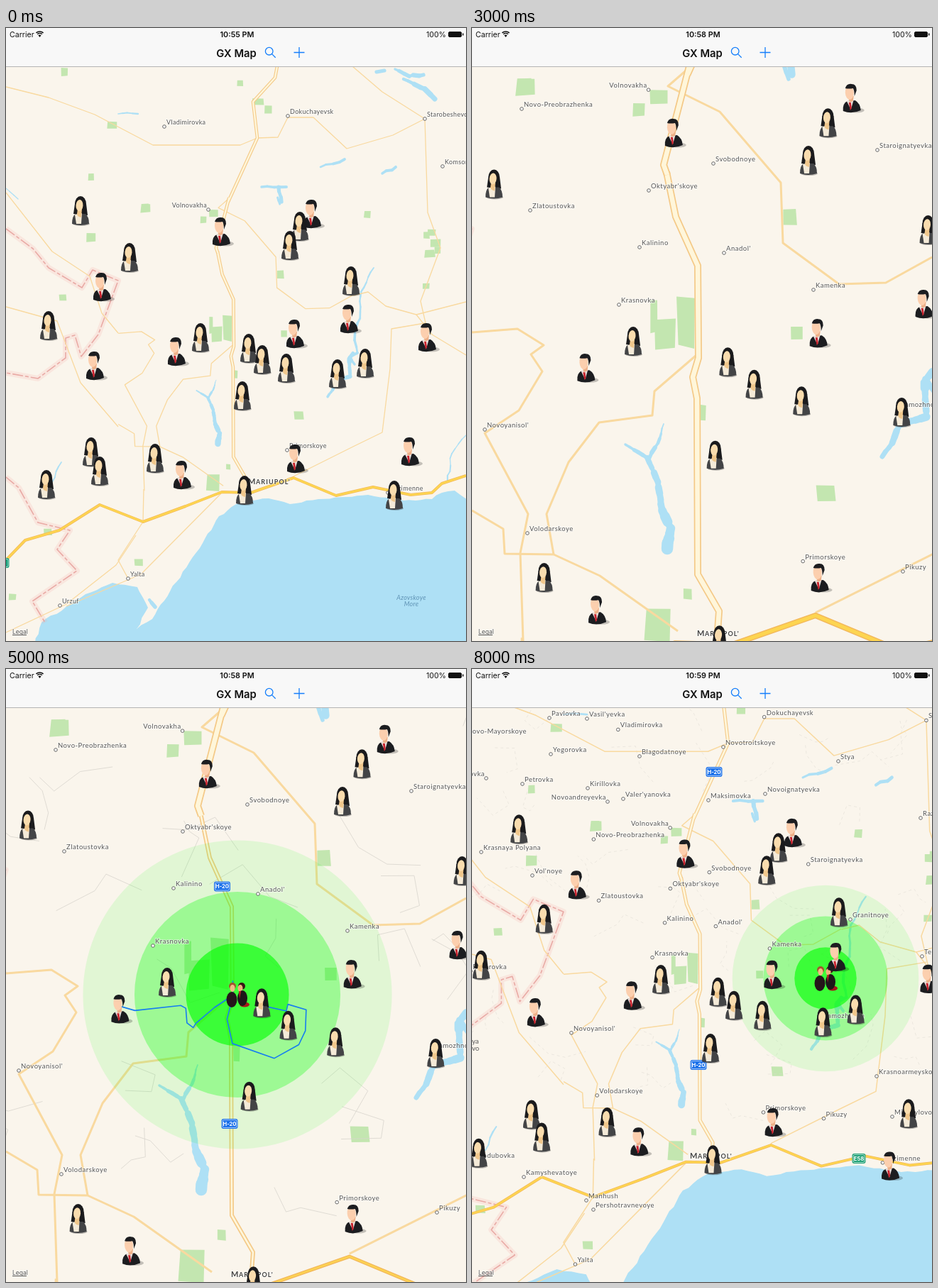
Animation of 648x864 px, one loop 9 s. Source, as an HTML page with a canvas:

```html
<!DOCTYPE html>
<html lang="en">
<head>
<meta charset="utf-8">
<title>Map demo</title>
<style>
  html, body { margin: 0; height: 100%; overflow: hidden; background: #faf5ec; }
  canvas { display: block; width: 648px; height: 864px; }
</style>
</head>
<body>
<canvas id="stage" width="648" height="864"></canvas>
<script>
const g = document.getElementById('stage').getContext('2d');
const UI = 'Inter, Roboto, sans-serif', MAP = 'Lato, "Open Sans", sans-serif';
const BLUE = '#147efb', WATER = '#aee0f5', PARK = '#c3e6b0';

// Map views: scale and offset from the wide view, then line widths
const WIDE = { k: 1, x: 0, y: 0, road: 1.3, main: 4.6, coast: 4 };
const TOWN = { k: 1.96, x: -310, y: -414.6, road: 3, main: 10, coast: 8 };
const NEAR = { k: 3.583, x: -833.7, y: -1114.9, road: 4, main: 9, coast: 8 };
const AREA = { k: 1.183, x: -58, y: -79, road: 1.5, main: 5, coast: 4 };

const OLD_SPOT = [324.5, 445.7], NEW_SPOT = [470, 435.3];
const SCENES = [
  { view: WIDE, time: '10:55' },
  { view: WIDE, time: '10:57', callout: true },
  { view: WIDE, time: '10:57', callout: true, popover: true },
  { view: TOWN, time: '10:58' },
  { view: TOWN, time: '10:58', spot: OLD_SPOT, detail: true },
  { view: TOWN, time: '10:58', spot: OLD_SPOT, detail: true, routes: 2 },
  { view: NEAR, time: '10:59', spot: OLD_SPOT, detail: true, routes: 3 },
  { view: AREA, time: '10:59', spot: OLD_SPOT, routes: 3 },
  { view: AREA, time: '10:59', spot: NEW_SPOT }
];

function random(seed) {
  return () => {
    seed = (seed * 1664525 + 1013904223) >>> 0;
    return seed / 2 ** 32;
  };
}

const points = s => s.trim().split(/\s+/).map(p => p.split(',').map(Number));
const mix = (a, b, t) => a + (b - a) * t;

// Splits every segment into short ones with small seeded bends
function rough(pts, amount, seed = 7) {
  const rnd = random(seed);
  return pts.flatMap(([x, y], i) => {
    const [nx, ny] = pts[i + 1] || [x, y];
    const steps = Math.max(1, Math.round(Math.hypot(nx - x, ny - y) / 8));
    return Array.from({ length: steps }, (_, j) => {
      const bend = j ? amount * (rnd() - .5) : 0, t = j / steps;
      return [mix(x, nx, t) + bend, mix(y, ny, t) + bend];
    });
  });
}

// Each geometry layer: base view, then polylines of key points
const layer = (base, ...lines) => lines.map(s => [base, points(s)]);

const northRoad = [
  ...layer(WIDE, '382,54 379,70 348,104 354,155 313,245'),
  ...layer(TOWN, '306,54 270,193 275,207')
];
const southRoad = layer(TOWN, '274,203 287,266 318,335 319,465 311,492 317,522 318,770 348,822 345,864');
const coastRoad = layer(WIDE, '0,750 27,722 75,708 132,672 193,696 253,674 304,654 345,655 405,634 465,659 517,647 570,658 600,655 614,642 648,631');
const roads = [
  ...layer(WIDE,
    '0,83 60,98 125,122 207,165 330,165 354,155 383,154 397,126 433,126 480,170 545,151 590,128',
    '488,54 530,90 590,128 594,260 612,310 584,385 592,420',
    '489,377 510,372 535,392 578,404 648,386',
    '590,416 543,424 541,480 530,570 489,590 405,632',
    '578,404 600,432 648,461',
    '0,232 65,315 118,350 135,402 158,430',
    '194,650 193,696 158,750 172,776',
    '0,393 72,413 105,500 158,562',
    '0,852 85,812 155,757 183,715',
    '85,815 190,770 304,655'),
  ...layer(TOWN,
    '306,56 276,82 349,118 435,218 438,303 517,361 583,359 648,323',
    '0,429 64,424 101,447 83,460 99,484 66,539 18,571 79,685 68,740 72,864',
    '0,680 44,706 46,741 115,742 180,772 290,850',
    '315,462 257,512 254,546 179,556 136,612 105,685 115,742')
];
const border = layer(WIDE,
  '0,283 38,311 60,338 107,366 122,341 158,356 130,432 106,463 97,433 84,437 84,465 45,494 0,486',
  '0,633 18,648 45,697 90,708 72,735 100,765 37,808 55,838');
const routes = layer(NEAR,
  '27,512 65,523 183,510 196,517 199,555 215,567 222,556 270,515 317,484 317,446',
  '304,491 318,484 302,545 316,608 424,646 487,611 504,575 506,521 459,507 455,524 400,512',
  '506,521 520,448 587,455 602,444 618,395 626,392 620,425');
const sea = rough(points(`30,900 50,838 112,798 150,782 185,788 200,817 184,847 206,833 231,794 277,726 300,688
  330,668 370,663 400,671 440,664 510,658 560,666 600,664 614,655 632,652 660,672 660,900`), 2);

// Lakes and rivers: spine, start width, end width
const waters = [
  [WIDE, '522,62 533,60', 6, 7], [WIDE, '548,58 568,68 588,66', 4, 7], [WIDE, '560,72 590,86 604,100', 5, 11],
  [WIDE, '360,224 395,224', 4, 5], [WIDE, '384,224 388,245', 6, 3], [WIDE, '443,196 477,185', 3, 5],
  [WIDE, '530,205 549,196', 4, 5], [WIDE, '158,121 186,121', 2, 3], [WIDE, '202,806 210,816', 5, 6],
  [WIDE, '78,612 65,640', 2, 1.5], [WIDE, '648,574 628,600 622,640', 1.5, 2], [WIDE, '0,226 17,241', 1.2, 1.2],
  [WIDE, '491,474 484,464 495,458 491,440 499,400 500,372 518,338', 4, 1.5],
  [TOWN, '578,604 592,585 602,560 640,548 638,500 648,484', 8, 12],
  [TOWN, '216,587 247,606 262,640 268,680 280,705 275,734', 4, 15], [TOWN, '270,558 262,585 250,606', 2, 8],
  [TOWN, '440,54 446,72', 7, 4]
].map(([base, s, from, to], i) => [base, rough(points(s), 3 / base.k, i + 1), from, to]);

function quad(x, y, w, h, rnd) {
  return [[-1, -1], [1, -1], [1, 1], [-1, 1]].map(([sx, sy]) =>
    [x + sx * w / 2 * mix(.75, 1, rnd()), y + sy * h / 2 * mix(.8, 1, rnd())]);
}

const parkRandom = random(5);
const parks = [
  ...points(`82,62 330,78 355,104 369,115 150,137 120,210 196,253 509,263 119,295 592,364 80,380 187,753 9,802 59,710
    600,288 592,292 605,303 597,318 608,313`).map(([x, y]) =>
    [WIDE, quad(x, y, mix(9, 17, parkRandom()), mix(8, 14, parkRandom()), parkRandom)]),
  ...points(`76,83,30,26 264,97,28,22 235,115,20,20 447,266,22,24 457,430,18,20 498,656,30,24 325,542,10,24 304,798,14,16
    256,405,12,52 272,432,34,46 302,414,28,78 262,842,40,48`).map(p => [TOWN, quad(...p, parkRandom)])
];

// Faint lanes wander in straight runs with near square turns
const lanes = Array.from({ length: 55 }, (_, i) => {
  const rnd = random(i * 7919 + 3);
  rnd();
  let x = rnd() * 648, y = 70 + rnd() * 510, turn = rnd() * 6;
  return Array.from({ length: 4 }, () => {
    turn += rnd() < .5 ? 1.4 : -.5;
    const run = 8 + rnd() * 24;
    return [x += Math.cos(turn) * run, y += Math.sin(turn) * run];
  });
});

// Leading "<" puts the text left of its dot
const labels = [
  [WIDE, `Vladimirovka,223,139 Dokuchayevsk,397,124 Starobeshevo,590,128 Komsomolskoye,615,195 <Volnovakha,285,256
    Primorskoye,396,595 Bezimenne,538,655 Yalta,172,776 Urzuf,76,814`],
  [TOWN, `Novo-Preobrazhenka,70,114 Svobodnoye,340,191 Oktyabr'skoye,249,229 Zlatoustovka,82,257 Kalinino,236,309
    Anadol',355,317 Kamenka,481,369 Krasnovka,207,390 Novoyanisol',18,566 Volodarskoye,78,712 Pikuzy,607,766
    Staroignatyevka,571,172 Zamozhnoye,601,537`],
  [AREA, `Pavlovka,109,69 Vasil'yevka,162,70 Yegorovka,111,120 Novo-Mayorskoye,-10,94 Petrovka,71,162 <Dubrovka,20,154
    Kirillovka,163,168 <Novoandreyevka,191,187 Valer'yanovka,213,183 Blagodatnoye,236,123 Novotroitskoye,354,110
    Stya,516,130 Maksimovka,333,185 Novoignatyevka,413,176 Krasnaya_Polyana,13,258 Vol'noye,85,291 Granitnoye,533,353
    Razdolnoye,632,210 Telmanovo,634,405 Krasnoarmeyskoye,570,574 Mikhaylovo-Ka,592,631 Starodubovka,-6,692
    Fedorovka,-2,426 Kamyshevatoye,73,716 Manhush,161,749 Pershotravnevoye,171,762`]
];

// Upper case types swap their figure in the area view
const pins = Object.entries({
  w: '105,258 60,420 120,598 132,625 57,644 210,607 274,437 414,280 400,307 486,357 342,452 361,468 395,480 333,519 467,488 506,473 336,652',
  m: '125,476 248,630 240,456 303,287 431,262 483,410 407,431 593,436 408,607',
  W: '174,324 547,659',
  M: '135,365 569,597'
}).flatMap(([type, s]) => points(s).map(([x, y]) => ({ type, x, y }))).sort((a, b) => a.y - b.y);

let view;

const place = (base, x, y) => {
  const k = view.k / base.k;
  return [x * k + view.x - base.x * k, y * k + view.y - base.y * k];
};

function trace(base, pts) {
  g.beginPath();
  for (const p of pts) g.lineTo(...place(base, ...p));
}

function area(base, pts, color) {
  trace(base, pts);
  g.fillStyle = color;
  g.fill();
}

function line(base, pts, color, width, dash = []) {
  trace(base, pts);
  g.setLineDash(dash);
  g.strokeStyle = color;
  g.lineWidth = width;
  g.stroke();
  g.setLineDash([]);
}

function cased(parts, width, edge, core, rim) {
  for (const part of parts) line(...part, edge, width);
  for (const part of parts) line(...part, core, width - rim);
}

function water([base, pts, from, to], i) {
  const rnd = random(i + 40), k = view.k / base.k;
  g.lineCap = 'round';
  pts.slice(1).forEach((p, j) =>
    line(base, [pts[j], p], WATER, mix(from, to, j / pts.length) * mix(.75, 1.2, rnd()) * k));
  g.lineCap = 'butt';
}

function text(s, x, y, size, color, { align = 'left', weight = 400, family = UI, spacing = 0, halo } = {}) {
  g.font = `${weight} ${size}px ${family}`;
  g.textAlign = align;
  g.letterSpacing = spacing + 'px';
  if (halo) {
    g.strokeStyle = 'rgba(255,255,255,.55)';
    g.lineWidth = 2;
    g.strokeText(s, x, y);
  }
  g.fillStyle = color;
  g.fillText(s, x, y);
  g.letterSpacing = '0px';
}

function box(x, y, w, h, r, fill, stroke, width = 1) {
  g.beginPath();
  g.roundRect(x, y, w, h, r);
  if (fill) { g.fillStyle = fill; g.fill(); }
  if (stroke) { g.strokeStyle = stroke; g.lineWidth = width; g.stroke(); }
}

function oval(x, y, rx, ry, color, tilt = 0) {
  g.beginPath();
  g.ellipse(x, y, rx, ry, tilt, 0, 7);
  g.fillStyle = color;
  g.fill();
}

function ring(x, y, r, color, width = 1, fill) {
  if (fill) oval(x, y, r, r, fill);
  g.beginPath();
  g.arc(x, y, r, 0, 7);
  g.strokeStyle = color;
  g.lineWidth = width;
  g.stroke();
}

function shape(d, color) {
  g.fillStyle = color;
  g.fill(new Path2D(d));
}

function at(x, y, draw) {
  g.save();
  g.translate(x, y);
  draw();
  g.restore();
}

function woman() {
  oval(1, 18, 12, 3, 'rgba(0,0,0,.25)');
  oval(0, -10, 8, 11, '#1b1b1d');
  shape('M-8-10L-10 4L10 6L8-10Z', '#1b1b1d');
  shape('M-12 18Q-12 7-7 4L7 4Q12 8 12 18Q0 22-12 18Z', '#434446');
  shape('M-8 5L2 3L1 18L-6 18Z', '#f4ead8');
  shape('M-4-3H2L1 9Q-5 8-5 4Z', '#f0c78c');
  oval(-1.5, -8, 5, 8, '#f9dcae', .08);
  shape('M-8-8Q-6-16 0-17Q6-13 4-3Q9-15 1-20Q-7-18-8-8Z', '#1b1b1d');
}

function man() {
  oval(7, 17, 11, 3.5, 'rgba(0,0,0,.22)');
  shape('M-12 18Q-13 7-6 4L5 3Q12 7 13 17Q0 23-12 18Z', '#1c1d20');
  shape('M-7 4L3 2L-1 16Z', '#e9dfdb');
  shape('M-4 6H-1L0 14L-2 17Z', '#c8202b');
  shape('M-5-3H3L2 4L-3 6Z', '#eeb088');
  oval(-3, -8, 6, 10, '#fccfae', -.05);
  shape('M-9-14Q-7-21 0-20Q7-20 7-11L4-3Q4-11 2-14Q-4-13-9-14Z', '#1c1d20');
}

function meeting() {
  oval(10, 14, 7, 3.5, '#a8141c');
  oval(-7, -12, 5, 5, '#a3552f');
  oval(-7, -9, 3.5, 5, '#f1bd85');
  oval(-8, 7, 7.5, 11, '#25151a');
  oval(6, -12, 5, 5, '#3a1715');
  oval(4, -9, 3.5, 5, '#eeb37e');
  oval(7, 5, 7, 11, '#1d1719');
  shape('M2-5H5L3 6Z', '#c4212b');
}

function badge(base, bx, by, s, fill = '#1d72ea', ink = '#fff', w = 23) {
  const [x, y] = place(base, bx, by);
  box(x - w / 2, y - 7, w, 14, 3, fill);
  box(x - w / 2 + 1.5, y - 5.5, w - 3, 11, 2, null, ink, .6);
  text(s, x, y + 2.8, 7.6, ink, { align: 'center', weight: 700 });
}

function drawMap({ detail }) {
  g.fillStyle = '#faf5ec';
  g.fillRect(0, 0, 648, 864);
  g.lineJoin = 'round';
  for (const [base, pts] of parks) area(base, pts, PARK);
  area(WIDE, sea, WATER);
  waters.forEach(water);
  for (const [base, pts] of border) {
    line(base, pts, 'rgba(240,160,155,.18)', 8);
    line(base, pts, '#e9aaa5', 1.6, [15, 3, 5, 3]);
  }
  if (detail) for (const lane of lanes) line(WIDE, lane, '#d8d5cd', .8);
  if (view === AREA) for (const lane of lanes) line(WIDE, lane, '#dcd8d0', .5, [4, 4]);

  const close = view.k > 1.5, slim = detail && view === TOWN;
  for (const [base, pts] of roads) line(base, pts, '#f9d99f', view.road);
  cased(southRoad, slim ? 6 : view.main, '#f4c987', '#fff6da', close ? 3.4 : 2.2);
  cased(northRoad, view.main, '#f4c987', '#fff6da', close ? 3.4 : 2.2);
  cased(coastRoad, slim ? 5 : view.coast, '#f3b95c', '#fdd550', close ? 3 : 1.5);
}

function drawLabels({ detail }) {
  const small = view === WIDE;
  for (const [base, list] of labels) {
    if (base === TOWN && small || base === AREA && view !== AREA) continue;
    for (const item of list.split(/\s+/)) {
      const [raw, px, py] = item.split(',');
      const [x, y] = place(base, +px, +py), left = raw[0] === '<';
      ring(x, y, 2.3, '#666', 1, '#fff');
      text(raw.replace('<', '').replace('_', ' '), x + (left ? -2 : 3), y - 3, small ? 9 : 9.5, '#555',
        { align: left ? 'right' : 'left', family: MAP, spacing: small ? .35 : .5, halo: true });
    }
  }
  const [cx, cy] = small ? [341, 643] : view === AREA ? [307, 690] : place(TOWN, 317, 857);
  const city = { weight: 700, family: MAP, spacing: 1.1, halo: true };
  text('M', cx, cy, 11, '#444', city);
  text("ARIUPOL'", cx + 11, cy, 9, '#444', city);
  ['Azovskoye', 'More'].forEach((s, i) => {
    const [x, y] = place(WIDE, 571, 806);
    text(s, x, y + i * 9, 9, '#5f93b5', { align: 'center', weight: 'italic 400', family: MAP, spacing: .3 });
  });
  if (detail) {
    badge(TOWN, 304.5, 306.5, 'H-20');
    badge(TOWN, 315, 641, 'H-20');
  }
  if (view === NEAR) badge(NEAR, 648, 282, 'T-0519', '#f5c518', '#3a3520', 36);
  if (small) badge(WIDE, -7, 754, 'E58', '#16a07a');
  if (view === AREA) {
    badge(AREA, 341, 145, 'H-20');
    badge(AREA, 319, 558, 'H-20');
    badge(AREA, 545, 690, 'E58', '#1fa277', '#fff', 19);
    ['ya', 'vo'].forEach((s, i) => text(s, 0, 528 + i * 10, 9.5, '#555', { family: MAP }));
  }
}

function drawRadius(spot) {
  const [x, y] = place(WIDE, ...spot);
  [.62, .3, .1].forEach((alpha, i) => {
    const r = 37 * (i + 1) * view.k;
    oval(x, y, r, r, `rgba(0,255,0,${alpha})`);
  });
}

function drawPins({ spot }) {
  if (spot) at(...place(WIDE, ...spot), meeting);
  for (const { type, x, y } of pins) {
    const swapped = view === AREA && type < 'a';
    const isMan = (type.toLowerCase() === 'm') !== swapped;
    at(...place(WIDE, x, y), isMan ? man : woman);
  }
}

const PERSON = 'Ibrolan Dastvepk', BORN = '27/12/1991';

function drawCallout(dim) {
  const ink = dim ? '#6d6d6d' : BLUE, fill = 'rgba(255,255,255,.92)';
  box(328, 535, 166, 41, 7, fill);
  shape('M398 576H424L411 588Z', fill);
  text(PERSON, 338, 553, 13.6, '#111');
  text(BORN, 338, 568, 10.3, '#222');
  ring(472.5, 555, 9, ink);
  text('i', 472.5, 560, 14, ink, { align: 'center', family: '"Noto Serif", serif' });
}

function drawPopover() {
  g.save();
  g.shadowColor = 'rgba(0,0,0,.3)';
  g.shadowBlur = 150;
  box(358, 349, 211, 186, 9, '#fdfdfd');
  g.restore();
  shape('M449 535Q456 535 463 545Q470 535 477 535Z', '#f6f6f5');
  box(358, 349, 211, 37, [9, 9, 0, 0], '#f7f7f7');
  g.fillStyle = '#b9b9b9';
  g.fillRect(358, 386, 211, 1);
  text('User Info', 463.5, 373, 13.8, '#111', { align: 'center', weight: 600 });
  text('Done', 562, 373, 13.8, BLUE, { align: 'right' });
  [[PERSON, 'Name'], [BORN, 'Date Of Birth'], ['Male', 'Gender'], ['Ukraine, Bezimenne', 'Addr...']].forEach(([value, key], i) => {
    const y = 409 + i * 37.2;
    text(value, 372, y, 13.4, '#111');
    text(key, 555, y, 13.4, '#999', { align: 'right' });
  });
}

function drawBar({ time, popover }) {
  const ink = popover ? '#8b8b8b' : BLUE;
  g.fillStyle = '#f8f8f8';
  g.fillRect(0, 0, 648, 54);
  g.fillStyle = '#b4b4b4';
  g.fillRect(0, 54, 648, 1);
  text('Carrier', 5, 12.5, 10.6, '#111');
  text(time + ' PM', 325.5, 12.5, 10.8, '#111', { align: 'center', weight: 600 });
  text('100%', 620, 12.5, 10.6, '#111', { align: 'right' });
  g.strokeStyle = '#111';
  g.lineWidth = 1.5;
  for (const r of [5, 7.6]) {
    g.beginPath();
    g.arc(47.5, 12.5, r, -2.3, -.84);
    g.stroke();
  }
  shape('M47.5 13L45.4 10.3Q47.5 8.7 49.6 10.3Z', '#111');
  box(623.5, 5.5, 18, 7, 1.5, '#111', '#111');
  g.fillStyle = '#111';
  g.fillRect(643, 7.5, 1.5, 3);
  text('GX Map', 324.5, 41, 14.8, '#111', { align: 'center', weight: 600 });
  ring(370.7, 32.7, 5.3, ink, 1.3);
  g.stroke(new Path2D('M374.6 36.6L379.7 41.7M405.5 34.5H420.5M413 27V42'));
}

function drawScene(scene) {
  view = scene.view;
  drawMap(scene);
  if (scene.spot) drawRadius(scene.spot);
  for (const [base, pts] of routes.slice(0, scene.routes || 0)) line(base, pts, '#167df0', 1.6);
  drawLabels(scene);
  drawPins(scene);
  text('Legal', 9, 854, 8.5, '#555', { halo: true });
  g.fillStyle = '#555';
  g.fillRect(9, 855, 20, 1);
  if (scene.callout) drawCallout(scene.popover);
  if (scene.popover) drawPopover();
  drawBar(scene);
}

let shown = -1;
function tick() {
  const i = Math.floor(performance.now() / 1000) % SCENES.length;
  if (i !== shown) drawScene(SCENES[shown = i]);
  requestAnimationFrame(tick);
}
tick();
</script>
</body>
</html>
```
